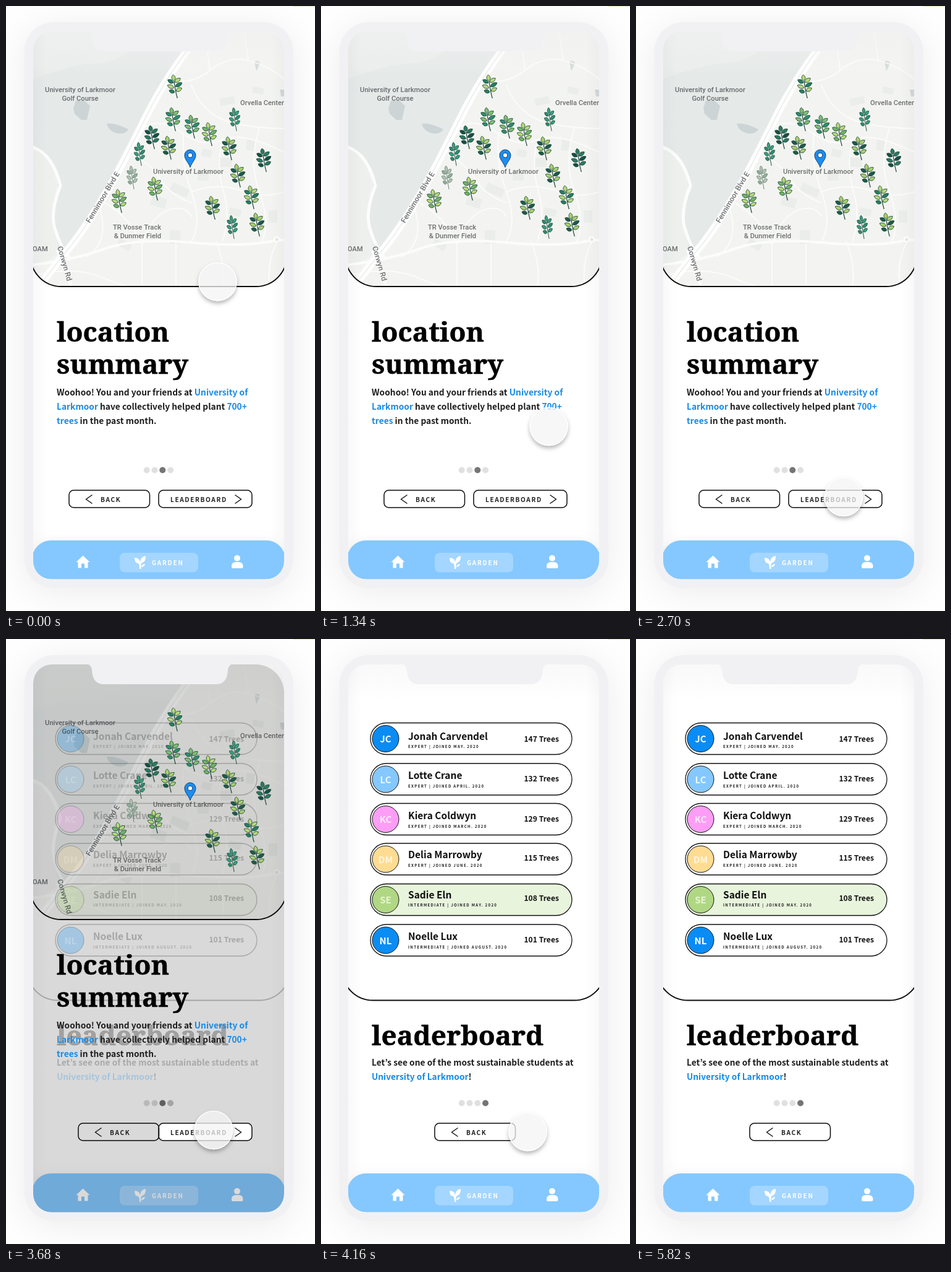
These frames come from a looping animation (500x977 px, 5.84 s). An HTML page with a canvas:

```html
<!DOCTYPE html>
<html lang="en">
<head>
<meta charset="utf-8">
<title>Garden app</title>
<style>
html, body { margin: 0; width: 100%; height: 100%; overflow: hidden; background: #fff; }
canvas { display: block; width: 500px; height: 977px; }
</style>
</head>
<body>
<canvas id="stage"></canvas>
<script>
const W = 500, H = 977, LOOP = 5840;
const canvas = document.getElementById('stage');
const ctx = canvas.getContext('2d');
const dpr = window.devicePixelRatio || 1;
canvas.width = W * dpr;
canvas.height = H * dpr;

const SANS = "'Source Sans Pro', 'Noto Sans CJK JP', 'Noto Sans CJK SC', 'Noto Sans CJK', 'Open Sans', sans-serif";
const SLAB = "'Roboto Slab', 'Noto Serif', serif";
const MAP = "Roboto, 'Open Sans', sans-serif";
const INK = '#1f1f1f', BLUE = '#168be8', SKY = '#84c8ff';
const SCHOOL = 'University of Larkmoor';

// Evens out optical size between fallback fonts, like font-size-adjust.
function sizeAdjust(weight, family, sample, ems) {
  ctx.font = `${weight} 100px ${family}`;
  return ems * 100 / ctx.measureText(sample).width;
}
const sansK = sizeAdjust(600, SANS, 'Let’s see one of the most sustainable students at', 20.92);
const slabK = sizeAdjust(700, SLAB, 'leaderboardlocationsummary', 14.02);

function write(s, x, y, size, { color = INK, align = 'left', gap = 0, weight = 600, family = SANS } = {}) {
  const k = family === SANS ? sansK : family === SLAB ? slabK : 1;
  ctx.font = `${weight} ${size * k}px ${family}`;
  ctx.letterSpacing = gap + 'px';
  ctx.textAlign = align;
  ctx.fillStyle = color;
  ctx.fillText(s, x, y);
  const w = ctx.measureText(s).width;
  ctx.letterSpacing = '0px';
  return w;
}

function runs(parts, x, y) {
  for (const [s, color] of parts) x += write(s, x, y, 15.63, { color });
}

function title(s, y) {
  write(s, 82, y, 48, { color: '#000', weight: 700, family: SLAB });
  ctx.lineWidth = 0.5;
  ctx.strokeStyle = '#000';
  ctx.strokeText(s, 82, y);
}

function box(x, y, w, h, r) {
  ctx.beginPath();
  ctx.roundRect(x, y, w, h, r);
}

function disc(x, y, r, fill) {
  ctx.beginPath();
  ctx.arc(x, y, r, 0, Math.PI * 2);
  if (fill) { ctx.fillStyle = fill; ctx.fill(); }
}

function line(d, color, width) {
  ctx.strokeStyle = color;
  ctx.lineWidth = width;
  ctx.stroke(new Path2D(d));
}

function shape(d, color) {
  ctx.fillStyle = color;
  ctx.fill(new Path2D(d));
}

function layer(alpha, draw) {
  if (alpha <= 0) return;
  ctx.save();
  ctx.globalAlpha *= Math.min(1, alpha);
  draw();
  ctx.restore();
}

// ---- phone ----
function phone() {
  ctx.fillStyle = '#fefefe';
  ctx.fillRect(0, 0, W, H);
  ctx.fillStyle = '#e3e8b8';
  ctx.fillRect(464, 0, 36, 1);
  ctx.save();
  ctx.shadowColor = 'rgba(0,0,0,.07)';
  ctx.shadowBlur = 55 * dpr;
  ctx.shadowOffsetY = 8 * dpr;
  box(29.5, 26, 435.5, 914, 48);
  ctx.fillStyle = '#f1f1f4';
  ctx.fill();
  ctx.restore();
}

function edges() {
  for (const [from, to] of [[44, 66], [450, 428]]) {
    const g = ctx.createLinearGradient(from, 0, to, 0);
    g.addColorStop(0, 'rgba(60,60,70,.03)');
    g.addColorStop(1, 'rgba(60,60,70,0)');
    ctx.fillStyle = g;
    ctx.fillRect(Math.min(from, to), 41, 22, 885);
  }
  const g = ctx.createLinearGradient(0, 41, 0, 100);
  g.addColorStop(0, 'rgba(60,60,70,.03)');
  g.addColorStop(1, 'rgba(60,60,70,0)');
  ctx.fillStyle = g;
  ctx.fillRect(44, 41, 406, 59);
}

function notch() {
  shape('M131 40 Q138 42 139 50 Q140 73 158 73 H340 Q358 73 359 50 Q360 42 367 40 Z', '#f1f1f4');
}

// ---- map ----
const MINOR = [
  'M262 120 Q300 128 330 104 T392 88 T450 118',
  'M330 104 L322 41', 'M392 88 L385 41', 'M300 128 Q312 160 340 178 T450 198',
  'M225 195 Q250 180 285 205 T350 216 T450 236', 'M288 205 Q282 250 300 300 T300 380',
  'M205 240 Q235 255 250 280 T300 318', 'M350 216 Q340 260 352 300 T350 380',
  'M300 300 Q340 285 380 298 T450 300', 'M410 198 Q392 250 410 300 T414 380',
  'M160 318 Q200 340 220 385 L220 453', 'M220 385 Q235 340 262 330 T300 340',
  'M275 383 V453', 'M340 380 Q356 420 350 453', 'M438 380 Q420 420 428 453',
  'M44 436 Q110 418 160 440 T235 453', 'M150 322 Q170 380 130 405'
];
const BLOCKS = [[238, 305, 24, 16, .3], [265, 362, 17, 22, 0], [318, 230, 16, 12, .2], [345, 245, 20, 15, 0],
  [270, 285, 30, 14, .4], [185, 375, 22, 12, .5], [390, 215, 14, 18, .1], [310, 268, 18, 14, 0],
  [362, 325, 20, 12, .2], [425, 330, 14, 20, 0], [345, 150, 24, 12, -.2], [400, 130, 18, 10, .2]];

function mapBase() {
  ctx.save();
  box(40, -40, 415, 493, 50);
  ctx.clip();
  ctx.fillStyle = '#f3f4f1';
  ctx.fillRect(44, 41, 406, 412);
  shape('M44 41 H318 L262 112 L195 238 L122 360 L88 398 Q72 370 78 330 Q92 290 72 250 L44 230 Z', '#e5e9e8');
  shape('M44 41 H225 Q195 90 150 92 T44 118 Z', '#eaedeb');
  shape('M44 232 Q78 246 82 292 Q68 340 88 398 L44 425 Z', '#eef0ee');
  for (const [x, y, w, h, a] of BLOCKS) {
    ctx.save();
    ctx.translate(x, y);
    ctx.rotate(a);
    ctx.fillStyle = '#ebedea';
    ctx.fillRect(0, 0, w, h);
    ctx.restore();
  }
  shape('M109 165 L113 153 L127 153 L136 161 L131 184 L122 184 L111 174 Z', '#ccd4d6');
  shape('M163 190 Q176 188 198 199 Q194 207 182 206 Q166 203 163 190 Z', '#ccd4d6');
  shape('M402 90 Q409 86 411 93 L405 105 Z M443 135 H450 V146 H445 Z', '#d2d8d9');
  ctx.lineCap = 'round';
  for (const d of MINOR) line(d, '#fcfcfb', 1.8);
  line('M44 228 Q76 240 88 290 Q70 335 80 362 Q88 390 104 408', '#fcfcfc', 5);
  line('M44 418 Q110 410 160 392 T300 382 T438 378 H455', '#fcfcfc', 4);
  line('M84 396 L106 455', '#fcfcfc', 5);
  const blvd = 'M318 40 Q262 108 226 180 T172 284 Q128 362 96 398 L54 452';
  line(blvd, '#fff', 12);
  line(blvd, '#e4e7e6', 1.2);
  ctx.lineCap = 'butt';
  disc(438, 377, 5, '#fff');
  disc(438, 377, 2.5, '#e4e8e6');
  const g = ctx.createLinearGradient(0, 41, 0, 110);
  g.addColorStop(0, 'rgba(250,250,250,.65)');
  g.addColorStop(1, 'rgba(250,250,250,0)');
  ctx.fillStyle = g;
  ctx.fillRect(44, 41, 406, 70);
  ctx.restore();
}

function label(s, x, y, { align = 'center', turn = 0, size = 11.2 } = {}) {
  ctx.save();
  ctx.translate(x, y);
  ctx.rotate(turn * Math.PI / 180);
  write(s, 0, 0, size, { align, family: MAP, weight: 500, color: 'rgba(20,24,27,.6)' });
  ctx.restore();
}

// x, y, angle in degrees, length, colour index
const LEAVES = [[1, 10, -158, 10, 1], [1, 8, -30, 11, 0], [0, 3, -155, 12, 0], [0, 1, -33, 13, 1],
  [-1, -5, -148, 11, 1], [-1, -6, -38, 12, 0], [-1, -8, -98, 11, 0]];
const TONES = {
  light: ['#b6da78', '#6fb562'], mixed: ['#b6da78', '#23805f'], green: ['#7fbf70', '#2c8f6b'],
  teal: ['#35a07c', '#2b8d70'], dark: ['#2b7a60', '#174f45'], deep: ['#a9d16b', '#1d5b48'],
  grey: ['#b3c4b2', '#8fae9c']
};
const PLANTS = [[273, 130, 'mixed'], [270, 183, 'green'], [301, 195, 'green'], [329, 207, 'light'],
  [370, 183, 'teal'], [236, 212, 'dark'], [263, 229, 'deep'], [216, 239, 'teal'], [204, 277, 'grey'],
  [183, 315, 'light'], [241, 295, 'light'], [361, 230, 'deep'], [417, 249, 'dark'], [375, 274, 'deep'],
  [397, 309, 'mixed'], [334, 326, 'deep'], [366, 357, 'teal'], [406, 353, 'deep']];

function plant(x, y, tone) {
  ctx.save();
  ctx.translate(x, y);
  ctx.scale(tone === 'teal' || tone === 'grey' ? .8 : 1.08, 1);
  ctx.strokeStyle = tone === 'grey' ? '#5d7767' : '#173f35';
  ctx.lineWidth = 1.1;
  ctx.beginPath();
  ctx.moveTo(4, 19);
  ctx.quadraticCurveTo(1, 8, -1, -9);
  ctx.stroke();
  ctx.lineWidth = .75;
  for (const [lx, ly, a, len, c] of LEAVES) {
    ctx.save();
    ctx.translate(lx, ly);
    ctx.rotate(a * Math.PI / 180);
    ctx.beginPath();
    ctx.moveTo(1.5, 0);
    ctx.bezierCurveTo(len * .35, -4, len * .75, -3.4, len, 0);
    ctx.bezierCurveTo(len * .75, 3.4, len * .35, 4, 1.5, 0);
    ctx.fillStyle = TONES[tone][c];
    ctx.fill();
    ctx.stroke();
    ctx.restore();
  }
  ctx.restore();
}

function mapMarks() {
  label(SCHOOL, 120, 139);
  label('Golf Course', 120, 153);
  label('Orvella Center', 379, 160, { align: 'left' });
  label('Fennimoor Blvd E', 160, 311, { turn: -59, size: 12 });
  label('Corwyn Rd', 91, 417, { turn: 74, size: 12 });
  label('OAM', 43, 396, { align: 'left' });
  label('TR Vosse Track', 212, 361);
  label('& Dunmer Field', 213, 375);
  for (const p of PLANTS) plant(...p);
  label(SCHOOL, 295, 271);
  const pin = 'M298 260.5 C295 252 289 248 289 241 A9 9 0 0 1 307 241 C307 248 301 252 298 260.5 Z';
  shape(pin, '#1b8df2');
  line(pin, '#12406f', 1);
  disc(298, 241, 3.8, '#fff');
  ctx.lineWidth = 1;
  ctx.stroke();
}

function cardEdge(x, bottom) {
  box(x, -60, 494 - 2 * x, bottom + 60, 50);
  ctx.strokeStyle = '#0b0b0b';
  ctx.lineWidth = 2;
  ctx.stroke();
}

// ---- controls ----
function button(x, w, s, textX, arrowX, dir) {
  box(x, 782, w, 28, 7.5);
  ctx.lineWidth = 1.5;
  ctx.strokeStyle = '#0b0b0b';
  ctx.stroke();
  write(s, textX, 801, 11.5, { gap: 1.6, weight: 700 });
  line(`M${arrowX + 5 * dir} 789.5 L${arrowX - 5 * dir} 796.5 L${arrowX + 5 * dir} 803.5`, '#0b0b0b', 1.3);
}

function dots(active) {
  for (let i = 0; i < 4; i++) {
    disc(227.7 + 12.8 * i, 749.5, 5, `rgba(0,0,0,${i === active ? .54 : .12})`);
  }
}

function nav() {
  ctx.save();
  ctx.shadowColor = 'rgba(0,0,0,.05)';
  ctx.shadowBlur = 14 * dpr;
  box(42, 863, 410, 62.5, 31);
  ctx.fillStyle = SKY;
  ctx.fill();
  ctx.restore();
  box(184, 883, 127, 31.5, 8);
  ctx.fillStyle = 'rgba(255,255,255,.26)';
  ctx.fill();
  shape('M124.5 887.5 L113.5 898 H116.5 V907.5 H122 V900.5 H127 V907.5 H132.5 V898 H135.5 Z', '#fff');
  shape('M216 909 Q216 902 214 900 Q208 900 208 891 Q216 891 217 898 Q218 889 226 888 Q227 897 219 900 Q218 904 218.5 909 Z', '#fff');
  shape('M219 906 Q220 901 225 901 Q224 906 219 906 Z', '#fff');
  write('GARDEN', 236, 903, 11.3, { gap: 1.8, weight: 700, color: '#fff' });
  disc(374, 891.8, 5, '#fff');
  box(365, 898, 18.5, 10, [6, 6, 2, 2]);
  ctx.fill();
}

// ---- pages ----
function summary() {
  cardEdge(39.5, 453);
  mapMarks();
  title('location', 542);
  title('summary', 594);
  runs([['Woohoo! You and your friends at ', INK], ['University of', BLUE]], 82, 629);
  runs([['Larkmoor', BLUE], [' have collectively helped plant ', INK], ['700+', BLUE]], 82, 652);
  runs([['trees', BLUE], [' in the past month.', INK]], 82, 675);
  dots(2);
  box(247, 782, 151, 28, 7.5);
  ctx.fillStyle = '#fff';
  ctx.fill();
  button(247, 151, 'LEADERBOARD', 266, 375.5, -1);
}

// top, name, note, trees, name/note/count baselines, initials, fill, initials colour
const ROWS = [
  [135.5, 'Jonah Carvendel', 'EXPERT | JOINED MAY. 2020', 147, 163, 176, 166, 'JC', '#0a8cf5', '#fff'],
  [201, 'Lotte Crane', 'EXPERT | JOINED APRIL. 2020', 132, 225.5, 239.5, 230, 'LC', SKY, '#eef7ff'],
  [265.5, 'Kiera Coldwyn', 'EXPERT | JOINED MARCH. 2020', 129, 291, 304.5, 295, 'KC', '#fd9df6', '#ffeafd'],
  [330, 'Delia Marrowby', 'EXPERT | JOINED JUNE. 2020', 115, 354, 367.5, 358, 'DM', '#ffdc91', '#fff6e2'],
  [395.5, 'Sadie Eln', 'INTERMEDIATE | JOINED MAY. 2020', 108, 419, 432, 423, 'SE', '#b0d884', '#e6f4d2'],
  [461, 'Noelle Lux', 'INTERMEDIATE | JOINED AUGUST. 2020', 101, 486, 499.5, 490, 'NL', '#0a8cf5', '#fff']
];

function leaderboard() {
  cardEdge(34, 583.5);
  for (const [top, name, note, trees, y1, y2, y3, mark, fill, tint] of ROWS) {
    box(80, top, 326, 51, 25.5);
    if (mark === 'SE') {
      ctx.fillStyle = 'rgba(140,200,80,.2)';
      ctx.fill();
    }
    ctx.strokeStyle = '#111';
    ctx.lineWidth = 1.3;
    ctx.stroke();
    const mid = top + 25.5;
    disc(104.5, mid, 21.5, fill);
    ctx.lineWidth = 1;
    ctx.stroke();
    write(mark, 104.5, mid + 6, 17, { color: tint, align: 'center', weight: 700 });
    write(name, 141, y1, 17.6, { color: '#111' });
    write(note, 141, y2, 7, { gap: 1.3, weight: 700 });
    write(trees + ' Trees', 385, y3, 13.8, { color: '#111', align: 'right' });
  }
  title('leaderboard', 656);
  runs([['Let’s see one of the most sustainable students at', INK]], 82, 689);
  runs([[SCHOOL, BLUE], ['!', INK]], 82, 711.5);
  dots(3);
}

// ---- touch point: time, x, y ----
const TOUCH = [[0, 342.5, 445], [820, 367.5, 576], [1920, 362, 778], [2700, 336, 793],
  [3680, 336, 793], [4160, 334.5, 796], [4860, 411, 667], [5500, 492, 560], [5840, 520, 530]];

function slope(i, c) {
  const a = TOUCH[Math.max(0, i - 1)], p = TOUCH[i], b = TOUCH[Math.min(TOUCH.length - 1, i + 1)];
  if ((a !== p && a[c] === p[c]) || (b !== p && b[c] === p[c])) return 0;
  return (b[c] - a[c]) / (b[0] - a[0]);
}

function touchAt(t, c) {
  let i = 0;
  while (i < TOUCH.length - 2 && t >= TOUCH[i + 1][0]) i++;
  const a = TOUCH[i], b = TOUCH[i + 1], d = b[0] - a[0], u = (t - a[0]) / d, v = 1 - u;
  return a[c] * (1 + 2 * u) * v * v + slope(i, c) * d * u * v * v
    + b[c] * u * u * (3 - 2 * u) - slope(i + 1, c) * d * u * u * v;
}

function touch(t) {
  const x = touchAt(t, 1), y = touchAt(t, 2);
  const press = t > 2980 && t < 3240 ? Math.sin((t - 2980) / 260 * Math.PI) : 0;
  const r = 31.3 - 1.5 * press;
  ctx.save();
  ctx.beginPath();
  ctx.rect(0, 0, W, H);
  ctx.arc(x, y, r, 0, Math.PI * 2);
  ctx.clip('evenodd');
  ctx.shadowColor = 'rgba(0,0,0,.28)';
  ctx.shadowBlur = 6 * dpr;
  ctx.shadowOffsetY = 4 * dpr;
  disc(x, y, r, '#fff');
  ctx.restore();
  disc(x, y, r, 'rgba(244,244,246,.75)');
  disc(x, y, r - .7);
  ctx.strokeStyle = 'rgba(255,255,255,.85)';
  ctx.lineWidth = 1.4;
  ctx.stroke();
}

function draw(t) {
  const u = Math.min(1, Math.max(0, (t - 3655) / 400));
  const p = 1 - (1 - u) ** 3;
  ctx.setTransform(dpr, 0, 0, dpr, 0, 0);
  phone();
  ctx.save();
  box(44, 41, 406, 885, [30, 30, 30, 30]);
  ctx.clip();
  ctx.fillStyle = '#fff';
  ctx.fillRect(44, 41, 406, 885);
  layer(1 - p, mapBase);
  edges();
  nav();
  // both pages are half transparent mid-fade, so the screen darkens
  layer(p * (1 - p), () => {
    box(44, 41, 406, 885, [30, 46, 30, 30]);
    ctx.fillStyle = '#000';
    ctx.fill();
  });
  layer(p ** .8, leaderboard);
  layer((1 - p) * 1.25, summary);
  const shift = 82 * p;
  button(102 + shift, 130.5, 'BACK', 153 + shift, 134.5 + shift, 1);
  notch();
  touch(t);
  ctx.restore();
}

const start = performance.now();
function tick() {
  draw((performance.now() - start) % LOOP);
  requestAnimationFrame(tick);
}
tick();
</script>
</body>
</html>
```
